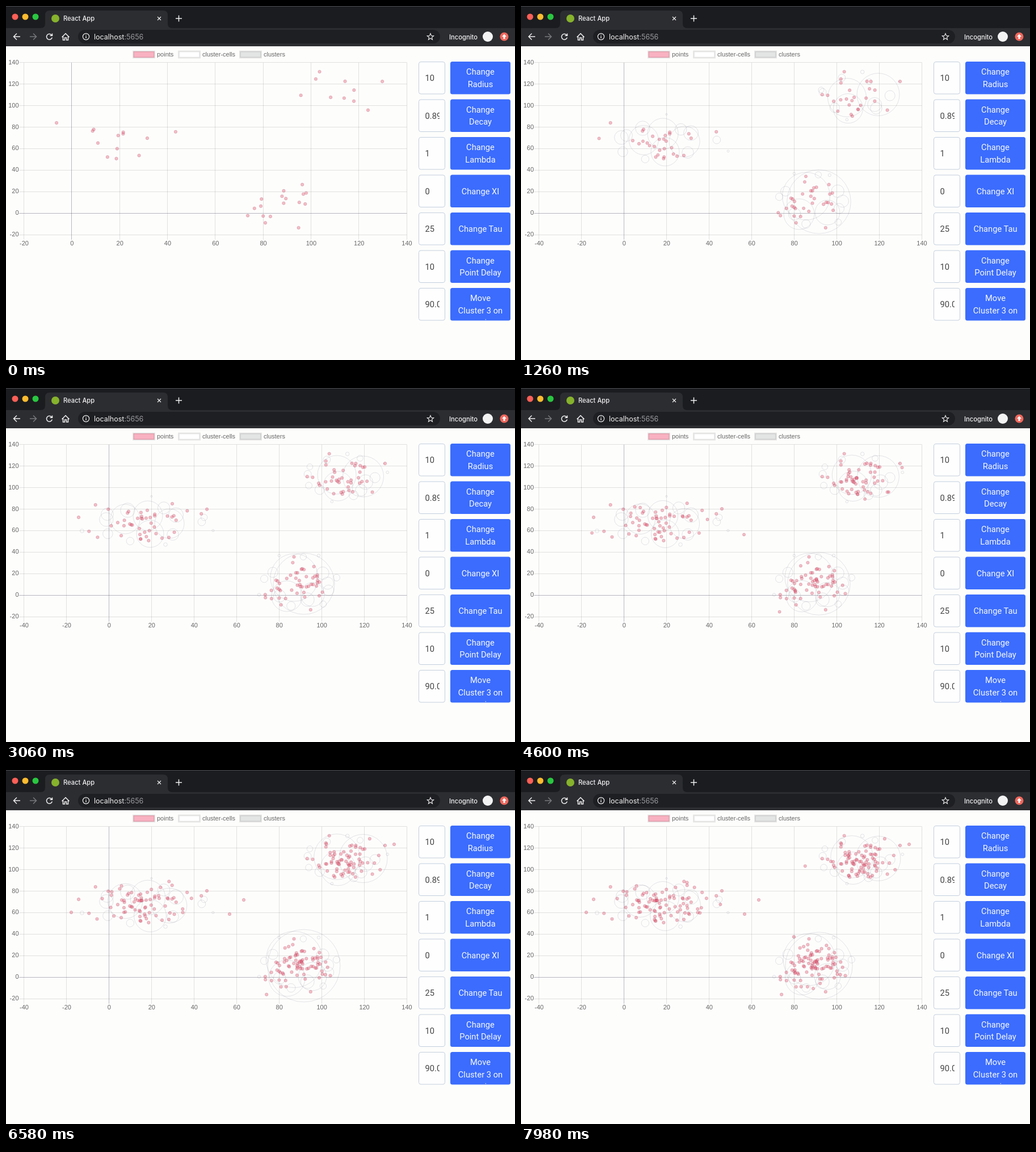
Animation, 897 px wide and 624 px high, one loop 8 s. Source, as an HTML page with a canvas:

```html
<!DOCTYPE html>
<html lang="en">
<head>
<meta charset="utf-8">
<title>React App</title>
<style>
  html, body { margin: 0; width: 100%; height: 100%; overflow: hidden; background: #fdfdfc; }
  svg, canvas { position: absolute; left: 0; top: 0; width: 897px; height: 624px; }
  .ui { font-family: Inter, sans-serif; font-size: 11.2px; font-weight: 500; fill: #f1f1f2; }
  .line { fill: none; stroke: #eeeeef; stroke-width: 1.5; }
  .panel { font: 14.7px Roboto, sans-serif; }
  .legend { font: 11px "Liberation Sans", sans-serif; fill: #666; }
</style>
</head>
<body>
<canvas id="chart" width="897" height="624"></canvas>
<svg viewBox="0 0 897 624">
  <rect width="897" height="71" fill="#1b1c1f"/>
  <rect width="897" height="1" fill="#4a4b4e"/>
  <path d="M61 39Q69 39 69 31V16Q69 8 77 8H277Q285 8 285 16V31Q285 39 293 39H897V71H0V39Z" fill="#2c2d31"/>
  <rect x="127" y="42" width="638" height="24" rx="12" fill="#1e1f22"/>
  <circle cx="16" cy="19" r="5.5" fill="#fd5f57"/>
  <circle cx="34" cy="19" r="5.5" fill="#fdbb2e"/>
  <circle cx="52" cy="19" r="5.5" fill="#29c740"/>
  <circle cx="87" cy="22" r="7" fill="#86b22c"/>
  <g class="ui">
    <text x="101" y="26">React App</text>
    <text x="155" y="58.5" font-size="12.5" font-weight="400">localhost<tspan fill="#9b9ca0">:5656</tspan></text>
    <text x="781" y="58.5">Incognito</text>
  </g>
  <g class="line">
    <path d="M267 19l6 6m0-6l-6 6" stroke-width="1.2"/>
    <path d="M299 22h11m-5.5-5.5v11"/>
    <path d="M25 54H13.5m5.5-5.5l-5.5 5.5l5.5 5.5"/>
    <path d="M42 54h11.5m-5.5-5.5l5.5 5.5l-5.5 5.5" stroke="#77787b"/>
    <path d="M80.5 51.2A5 5 0 1 0 81.3 55.5M81.5 48.5V52.3H77.5"/>
    <path d="M98.5 55L105 48.5L111.5 55M100.5 53.5V60H103.5V56H106.5V60H109.5V53.5"/>
    <circle cx="141" cy="54" r="5.6" stroke-width="1.2"/>
    <path d="M141 53v4m0-6.5v1.3" stroke-width="1.3"/>
    <path d="M748 48.5l1.6 3.8l4.1.3l-3.2 2.6l1 4l-3.5-2.2l-3.5 2.2l1-4l-3.2-2.6l4.1-.3Z" stroke-width="1.1"/>
  </g>
  <circle cx="849" cy="54" r="9" fill="#f3f3f4"/>
  <circle cx="878" cy="54" r="7.5" fill="#ee675c"/>
  <path d="M878 49.5l4 4.5h-2.5v4h-3v-4H874Z" fill="#fff"/>
  <g class="legend">
    <g stroke="#000" stroke-opacity=".1" stroke-width="2.7">
      <rect x="224.5" y="80" width="37" height="11" fill="#f8b1c0"/>
      <rect x="304.5" y="80" width="37" height="11" fill="#fff"/>
      <rect x="412.5" y="80" width="37" height="11" fill="#e3e4e4"/>
    </g>
    <text x="266" y="89">points</text>
    <text x="346" y="89">cluster-cells</text>
    <text x="454" y="89">clusters</text>
  </g>
  <g class="panel" id="panel"></g>
</svg>
<script>
const LOOP = 8000, MOVE = 760, WAVES = 10;
const LEFT = 32, RIGHT = 706.5, TOP = 99.8, BOTTOM = 403;
const ORIGIN = { x: 369, y: 365 };

const SETTINGS = [
  ['10', 'Change', 'Radius'], ['0.89', 'Change', 'Decay'], ['1', 'Change', 'Lambda'],
  ['0', 'Change XI'], ['25', 'Change Tau'], ['10', 'Change', 'Point Delay'],
  ['90.0', 'Move', 'Cluster 3 on', 'x axis']
];
document.getElementById('panel').innerHTML = SETTINGS.map(([value, ...lines], row) => {
  const y = 98 + row * 66.5;
  const baseline = y + (lines.length > 1 ? 23.2 : 34);
  const label = lines.map((line, i) =>
    `<text x="836" y="${baseline + i * 21.5}" text-anchor="middle" fill="#f6f8ff">${line}</text>`).join('');
  return `<clipPath id="value${row}"><rect x="738" y="${y}" width="26" height="57"/></clipPath>
    <clipPath id="label${row}"><rect x="783" y="${y}" width="106" height="56.5"/></clipPath>
    <rect x="727.5" y="${y + 0.5}" width="46" height="56.5" rx="3.5" fill="#fefefe" stroke="#c3cfdd"/>
    <text x="738.5" y="${y + 34}" fill="#444" clip-path="url(#value${row})">${value}</text>
    <rect x="783" y="${y}" width="106" height="57.5" rx="3.5" fill="#3b6cfd"/>
    <g clip-path="url(#label${row})">${label}</g>`;
}).join('');

// Centre, spread and opening size of each cluster; early and late are its main cells [x, y, r]
const CLUSTERS = [
  { x: 595, y: 158, sx: 29, sy: 16, opening: 9,
    early: [[629.5, 156, 36]], late: [[583, 153, 34], [585, 173, 26]] },
  { x: 245, y: 236, sx: 46, sy: 16, opening: 13,
    early: [[250, 225, 26], [288, 239, 26], [254, 257, 24]], late: [[210, 231, 26]] },
  { x: 518, y: 344, sx: 29, sy: 20, opening: 17,
    early: [[525, 345, 54], [540, 364, 21]], late: [[508, 334, 42], [495, 367, 27]] }
];
// Far points [x, y, wave]
const OUTLIERS = [
  [668, 133, -1], [128, 228, 1], [354, 213, 3], [115, 251, 5],
  [394, 254, 5], [684, 131, 5], [419, 229, 7], [505, 163, 9]
];

let seed = 11;
const random = () => {
  const s = Math.sin(++seed * 12.9898) * 43758.5453;
  return s - Math.floor(s);
};
const bell = () => (random() + random() + random() - 1.5) * 2;

const points = OUTLIERS.map(([x, y, wave]) => ({ x, y, wave }));
const cells = [];
for (const c of CLUSTERS) {
  for (let wave = -1; wave < WAVES; wave++) {
    const count = wave < 0 ? c.opening : 8;
    for (let i = 0; i < count; i++) points.push({ x: c.x + bell() * c.sx, y: c.y + bell() * c.sy, wave });
  }
  for (const [x, y, r] of c.early) cells.push({ x, y, r, wave: 0 });
  for (const [x, y, r] of c.late) cells.push({ x, y, r, wave: 1 });
  // Small cells ring the cluster and shrink outwards
  for (let i = 0; i < 14; i++) {
    const angle = i * 2.4, reach = 1.4 + 1.5 * random();
    cells.push({
      x: c.x + Math.cos(angle) * c.sx * reach,
      y: c.y + Math.sin(angle) * c.sy * reach,
      r: 1 + 8 * (2.9 - reach),
      wave: i < 8 ? 0 : 1 + i % 2
    });
  }
}

const ctx = document.getElementById('chart').getContext('2d');
const mix = (a, b, k) => a + (b - a) * k;
const easeOutQuart = k => 1 - (1 - k) ** 4;
const narrowAxisX = x => LEFT + (x - LEFT) * 1.125 - (RIGHT - LEFT) / 8;
const waveStart = n => Math.max(820 * n + 20, 840 * n - 20);
const swell = n => 1 + 0.08 * Math.max(0, 1 - n / 2) + 0.2 * Math.exp(-(((n - 7.5) / 1.7) ** 2));

function waveAt(time) {
  let wave = -1;
  while (wave + 1 < WAVES && waveStart(wave + 1) <= time) wave++;
  return wave;
}

function rule(x1, y1, x2, y2, zero) {
  ctx.strokeStyle = zero ? 'rgba(0,0,30,.27)' : 'rgba(0,0,0,.11)';
  ctx.beginPath();
  ctx.moveTo(x1, y1);
  ctx.lineTo(x2, y2);
  ctx.stroke();
}

function drawGrid(minX) {
  ctx.font = '11px "Liberation Sans", sans-serif';
  ctx.fillStyle = '#666';
  ctx.textBaseline = 'middle';
  ctx.lineWidth = 1;
  const snap = v => Math.floor(v) + 0.5;
  ctx.textAlign = 'center';
  for (let v = minX; v <= 140; v += 20) {
    const x = mix(LEFT, RIGHT, (v - minX) / (140 - minX));
    rule(snap(x - 0.5), TOP, snap(x - 0.5), BOTTOM + 9, v === 0);
    ctx.fillText(v, x, 419);
  }
  ctx.textAlign = 'right';
  for (let v = -20; v <= 140; v += 20) {
    const y = mix(BOTTOM, TOP, (v + 20) / 160);
    rule(23, snap(y), RIGHT, snap(y), v === 0);
    ctx.fillText(v, 22.5, y);
  }
}

function disc(x, y, r) {
  ctx.beginPath();
  ctx.arc(x, y, r, 0, 7);
}

function draw(time) {
  const wave = waveAt(time);
  const k = wave < 0 ? 1 : easeOutQuart(Math.min((time - waveStart(wave)) / MOVE, 1));
  ctx.clearRect(0, 0, 897, 624);
  drawGrid(wave < 0 ? -20 : -40);

  ctx.lineWidth = 0.9;
  ctx.strokeStyle = 'rgba(30,30,60,.13)';
  const scale = mix(swell(Math.max(wave - 1, 0)), swell(wave), k);
  for (const c of cells) {
    if (c.wave > wave) continue;
    const grow = c.wave === wave ? k : 1;
    const r = c.r > 20 ? c.r * scale : c.r;
    disc(mix(ORIGIN.x, c.x, grow), mix(ORIGIN.y, c.y, grow), r * grow);
    ctx.stroke();
  }

  ctx.fillStyle = 'rgba(232,84,112,.38)';
  ctx.strokeStyle = 'rgba(150,60,80,.27)';
  for (const p of points) {
    if (p.wave > wave) continue;
    let { x, y } = p, r = 2.7;
    if (p.wave < 0 && wave < 1) {
      x = wave < 0 ? narrowAxisX(x) : mix(narrowAxisX(x), x, k);
    } else if (p.wave === wave) {
      x = mix(ORIGIN.x, x, k);
      y = mix(ORIGIN.y, y, k);
      r *= k;
    }
    disc(x, y, r);
    ctx.fill();
    ctx.stroke();
  }
}

const began = performance.now();
function frame() {
  draw((performance.now() - began) % LOOP);
  requestAnimationFrame(frame);
}
frame();
</script>
</body>
</html>
```
